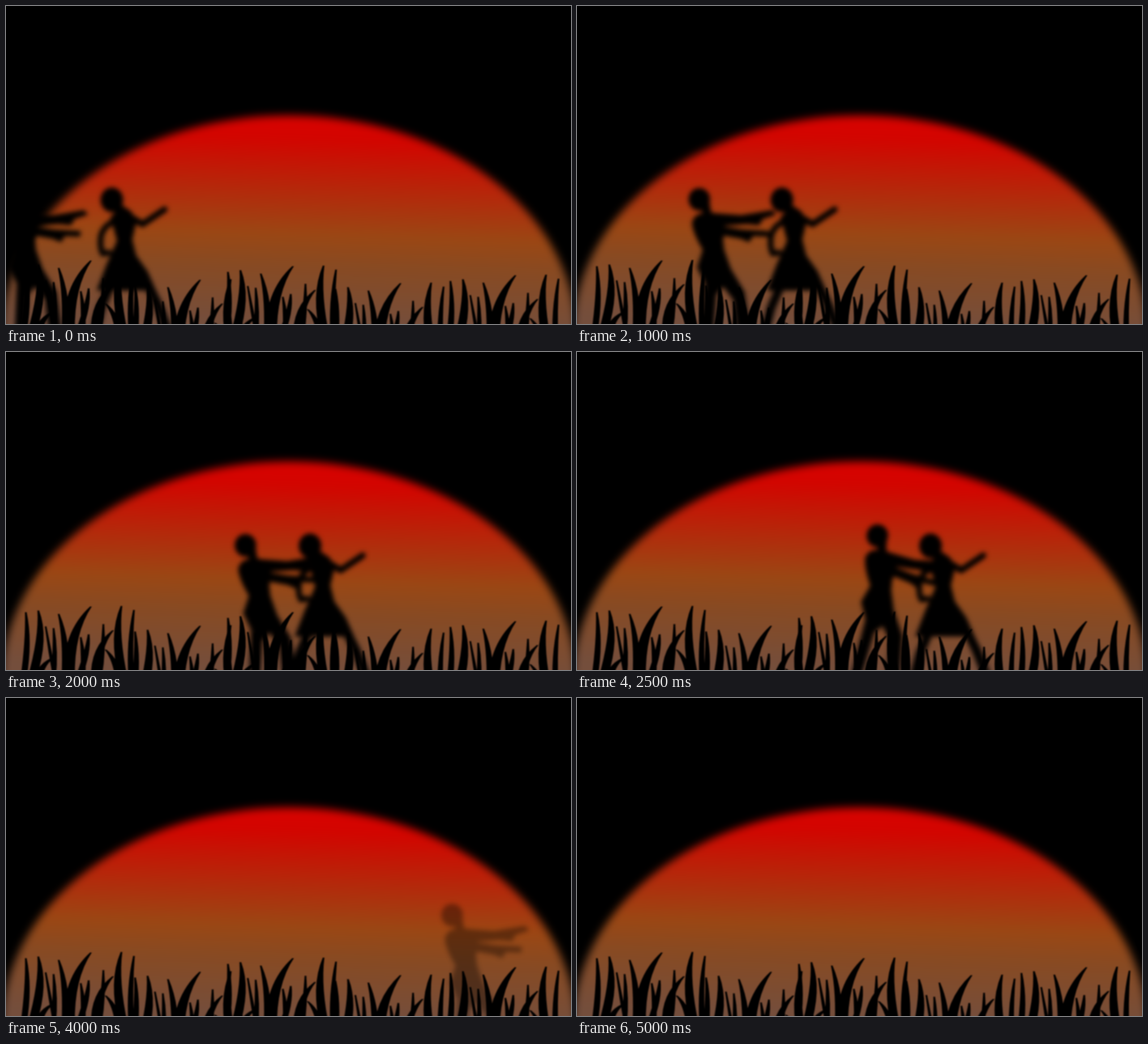
These frames come from a looping animation (998x561 px, 5500 ms). An HTML page:

```html
<!DOCTYPE html>
<html lang="en">
<head>
<meta charset="utf-8">
<title>Sunset chase</title>
<style>
  html, body { margin: 0; width: 100%; height: 100%; overflow: hidden; background: #000; }
  svg { display: block; width: 100%; height: 100%; }

  #cast, #zombie, #woman, #lean, #fallen { animation: 5500ms step-end infinite; }
  #cast { animation-name: fade; }
  #zombie { animation-name: chase, pose; transform-origin: 240px 430px; }
  #woman { animation-name: flee; }
  #runner { animation: run 5500ms steps(11) infinite; }
  #lean { animation-name: lean; }
  #fallen { animation-name: fallen; }

  /* one pose every 500 ms: 1/11 of the loop */
  @keyframes fade {
    0% { opacity: 1; }
    9.0909% { opacity: .37; }
    18.1818% { opacity: 1; }
    72.7272% { opacity: .37; }
  }
  @keyframes run { to { transform: translateX(962.5px); } }
  @keyframes chase {
    0% { translate: -207px; animation-timing-function: steps(5); }
    45.4545% { translate: 310.5px; }
    54.5454% { translate: 572px; }
    72.7272% { translate: 572px; animation-timing-function: steps(3); }
    100% { translate: 899px; }
  }
  @keyframes pose {
    0% { transform: none; visibility: visible; }
    45.4545% { transform: translate(-15px, -14px) rotate(12deg); }
    54.5454% { transform: translateY(110px); visibility: hidden; }
    63.6363% { transform: translateY(110px); visibility: visible; }
    72.7272% { transform: translateY(42px); }
    81.8181%, 100% { transform: translateY(35px); visibility: visible; }
  }
  @keyframes flee { 0% { visibility: visible; } 54.5454%, 100% { visibility: hidden; } }
  @keyframes lean {
    0% { visibility: hidden; }
    54.5454% { visibility: visible; }
    63.6363%, 100% { visibility: hidden; }
  }
  @keyframes fallen {
    0% { visibility: hidden; }
    54.5454% { visibility: visible; }
    72.7272%, 100% { visibility: hidden; }
  }
</style>
</head>
<body>
<svg viewBox="0 0 998 561" preserveAspectRatio="none">
  <defs>
    <linearGradient id="dusk" gradientUnits="userSpaceOnUse" x1="506" y1="210" x2="495" y2="561">
      <stop offset="0" stop-color="#d60300"/>
      <stop offset=".07" stop-color="#d20500"/>
      <stop offset=".55" stop-color="#9a4714"/>
      <stop offset=".7" stop-color="#884a22"/>
      <stop offset="1" stop-color="#744e3c"/>
    </linearGradient>
    <filter id="glow" filterUnits="userSpaceOnUse" x="-60" y="140" width="1120" height="520" color-interpolation-filters="sRGB">
      <feGaussianBlur stdDeviation="7.5"/>
    </filter>
    <filter id="soft" filterUnits="userSpaceOnUse" x="-60" y="240" width="1120" height="380" color-interpolation-filters="sRGB">
      <feGaussianBlur stdDeviation="4.5"/>
    </filter>
    <filter id="edge" filterUnits="userSpaceOnUse" x="-20" y="420" width="1040" height="170" color-interpolation-filters="sRGB">
      <feGaussianBlur stdDeviation="1"/>
    </filter>
  </defs>

  <rect width="998" height="561"/>
  <ellipse cx="500" cy="578" rx="507" ry="385" fill="url(#dusk)" filter="url(#glow)"/>

  <g id="cast">
    <g filter="url(#soft)" stroke-linecap="round" stroke-linejoin="round">
      <g id="zombie">
        <ellipse cx="216" cy="341" rx="19" ry="20"/>
        <path d="M216 350 L234 346 L237 364 L258 369 Q264 390 258 412 L260 430 L272 464 L296 504 L308 590
          L284 590 L276 518 L258 495 L246 510 L240 590 L222 590 L226 490 L212 461 L222 430
          Q204 400 203 382 Q208 366 222 366 Z"/>
        <path d="M236 365 L290 369 L345 360 L352 368 L328 376 L322 387 L300 385 L258 388 Z"/>
        <path d="M252 388 L290 394 L339 397 L338 407 L311 406 L304 417 L290 411 L252 404 Z"/>
      </g>

      <g id="woman"><g id="runner">
        <ellipse cx="187" cy="342" rx="20" ry="22"/>
        <path d="M186 355 L206 352 L222 363 L230 382 L223 412 L230 440 L250 468 L265 502 L160 502
          L178 455 L196 414 L188 385 L184 372 L192 366 Z"/>
        <g fill="none" stroke="#000" stroke-width="10">
          <path d="M212 367 L241 385 L280 359" stroke-width="11"/>
          <path d="M188 381 Q168 392 167 412 Q166 428 171 437 L182 435"/>
          <path d="M182 500 L168 532 L157 575" stroke-width="15"/>
          <path d="M250 490 L268 526 L287 575" stroke-width="16"/>
        </g>
      </g></g>

      <g id="lean">
        <ellipse cx="732" cy="447" rx="18" ry="19"/>
        <path d="M696 464 L716 460 L728 452 L736 470 L734 480 L748 500 L770 516 L780 540 L770 552
          L758 530 L738 530 L726 575 L638 575 L655 525 L680 500 L686 476 Z"/>
      </g>

      <g id="fallen">
        <path d="M780 502 Q800 484 823 496 L820 575 L780 575 Z"/>
        <path d="M829 446 Q841 433 854 446 L850 462 L838 463 Z"/>
        <g fill="none" stroke="#000">
          <path d="M820 510 L834 504 L847 455" stroke-width="10"/>
          <path d="M782 520 L750 512 L742 530" stroke-width="7"/>
          <path d="M820 540 L846 548 L870 516" stroke-width="4"/>
        </g>
      </g>
    </g>
  </g>

  <g id="grass" filter="url(#edge)"></g>
</svg>
<script>
  const ground = 575;

  // A blade runs from its root to its tip; the more it bends, the wider it grows.
  function blade(tipX, tipY, root, bend) {
    const width = 5 + Math.abs(bend);
    const midX = (tipX + root) / 2 + 2 * bend;
    const midY = (tipY + ground) / 2 - 1.5 * Math.abs(bend);
    const side = s => [root + s * width * .6, midX + s * width * .7, tipX + s * 1.5];
    const [l, ml, tl] = side(-1), [r, mr, tr] = side(1);
    return `M${l} ${ground}Q${ml} ${midY} ${tl} ${tipY}L${tr} ${tipY}Q${mr} ${midY} ${r} ${ground}Z`;
  }

  const clump = [
    blade(35, 459, 31, 4), blade(57, 456, 46, 8), blade(70, 484, 86, 0), blade(84, 487, 84, 2),
    blade(93, 462, 104, 5), blade(150, 449, 112, -11), blade(132, 503, 136, 2), blade(146, 498, 128, 4),
    blade(172, 480, 165, 2), blade(189, 491, 158, -8), blade(204, 448, 207, -8), blade(226, 455, 221, -3),
    blade(86, 538, 58, -5), blade(176, 525, 198, 4)
  ].join('');

  // The same clump stands five times along the ground.
  const spots = [[0, 0], [193, 34], [357, 10], [547, 40], [750, 26]];
  document.getElementById('grass').innerHTML = spots.map(([x, y]) =>
    `<path d="${clump}" transform="translate(${x} ${y})"/>`).join('');
</script>
</body>
</html>
```
